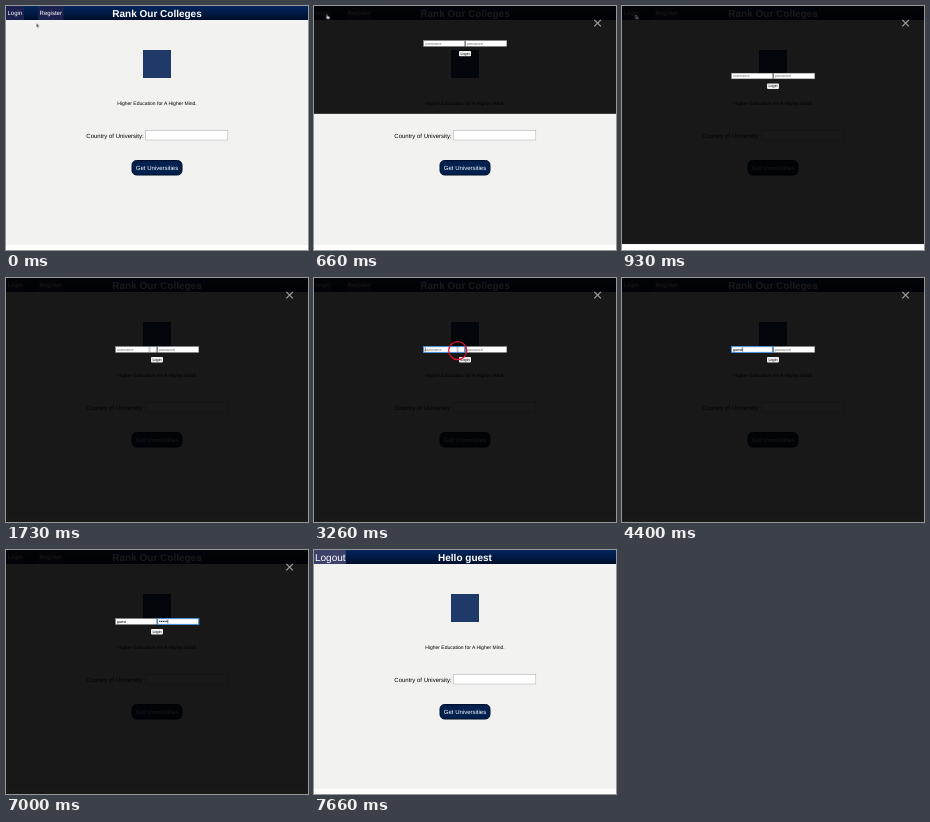
Write an HTML page that moves like this. It is 302x244 px and loops after 8000 ms.

```html
<!DOCTYPE html>
<html lang="en">
<head>
<meta charset="utf-8">
<title>Rank Our Colleges</title>
<style>
  html, body { margin: 0; width: 100%; height: 100%; overflow: hidden; background: #fff; }
  svg { display: block; width: 100vw; height: 100vh; --t: 0ms; }
  text { font-family: "Liberation Sans", Arial, sans-serif; font-size: 6px; text-rendering: geometricPrecision; white-space: pre; }
  .mid { text-anchor: middle; }
  .title { font-size: 10px; font-weight: bold; }
  .light { fill: #fff; }
  .small { font-size: 3.75px; }
  .hint { fill: #757575; }
  .field { fill: #fff; stroke: #a8a8a8; stroke-width: .5; }
  .focus { fill: none; stroke: #4a8fe0; stroke-width: 1; }
  .ring { fill: none; stroke: #e0142c; stroke-width: 1.2; }

  /* Animations stay paused; the clock --t moves them through their delay. */
  .curtain, .form, .ring, .cursor { animation: 500ms ease calc(534ms - var(--t)) both paused; }
  .curtain { animation-name: drop; }
  .form { animation-name: sink; }
  .ring { animation: fade 270ms ease-in calc(var(--at) - var(--t)) both paused; }
  .cursor { animation: travel 8000ms ease-in-out calc(0ms - var(--t)) both paused; }
  @keyframes drop { from { transform: translateY(-244px); } to { transform: none; } }
  @keyframes sink { from { transform: translateY(-61px); } to { transform: none; } }
  @keyframes fade { to { opacity: .1; } }
  @keyframes travel {
    0%, .4% { transform: translate(30.5px, 17.5px); }
    5%, 11% { transform: translate(12.5px, 8.5px); }
    21.6%, 55.4% { transform: translate(143.5px, 71.5px); }
    60%, 100% { transform: translate(172px, 71.5px); }
  }
</style>
</head>
<body>
<svg viewBox="0 0 302 244" preserveAspectRatio="none">
  <defs>
    <linearGradient id="navy" x2="0" y2="1">
      <stop stop-color="#00265c"/>
      <stop offset="1" stop-color="#000d2b"/>
    </linearGradient>
  </defs>

  <rect width="302" height="244" fill="#fff"/>
  <rect width="302" height="239" fill="#f2f2f1"/>
  <rect width="302" height="14" fill="url(#navy)"/>

  <g data-show="0-7660">
    <rect width="18" height="14" fill="#1c2250"/>
    <rect x="32" width="25.5" height="14" fill="#1c2250"/>
    <text class="light" x="1.5" y="9.4">Login</text>
    <text class="light" x="33.6" y="9.4">Register</text>
    <text class="title light mid" x="151" y="11">Rank Our Colleges</text>
  </g>
  <g data-show="7660-8000">
    <rect width="32" height="14" fill="#3c4168"/>
    <text class="light" x="1" y="11" style="font-size:10px">Logout</text>
    <text class="title light mid" x="151" y="11">Hello guest</text>
  </g>

  <rect x="137" y="44" width="28" height="28" fill="#1f3a68"/>
  <text class="mid" x="151" y="98.7" style="font-size:5px">Higher Education for A Higher Mind.</text>
  <text x="80.3" y="131.8">Country of University:</text>
  <rect class="field" x="139.5" y="124.7" width="82.3" height="9.3"/>
  <rect x="126" y="154.5" width="50" height="14.5" rx="4.5" fill="#00204e" stroke="#000c28"/>
  <text class="light mid" x="151" y="164">Get Universities</text>

  <g data-show="530-7530">
    <rect class="curtain" width="302" height="244" fill="#000" fill-opacity=".9"/>
    <g data-show="560-7530">
      <path d="M280.3 13.8l6.6 6.6m0-6.6l-6.6 6.6" stroke="#a0a0a0" stroke-width="1.2"/>
      <g class="form">
        <rect class="field" x="109.7" y="68.7" width="41" height="5.6"/>
        <rect class="field" x="151.7" y="68.7" width="41" height="5.6"/>
        <rect class="focus" data-show="3260-4860" x="109.6" y="68.6" width="41.2" height="5.8"/>
        <rect class="focus" data-show="4860-7530" x="151.6" y="68.6" width="41.2" height="5.8"/>
        <text class="small hint" data-show="0-3800" x="110.9" y="72.6">username</text>
        <text class="small hint" data-show="0-6400" x="152.9" y="72.6">password</text>
        <text class="small" id="user" x="110.9" y="72.6"></text>
        <text class="small" id="pass" x="152.9" y="72.9" style="font-size:5px"></text>
        <rect id="caret" y="69.5" width=".5" height="4"/>
        <rect x="145" y="79" width="12" height="5.4" rx=".8" fill="#f0f0f0"/>
        <text class="small mid" x="151" y="82.9">Login</text>
      </g>
    </g>
  </g>

  <circle class="ring" data-show="460-660" cx="13" cy="10" r="9" style="--at:460ms"/>
  <circle class="ring" data-show="3260-3530" cx="143.7" cy="72.6" r="9" style="--at:3260ms"/>
  <circle class="ring" data-show="4860-5130" cx="172" cy="71.7" r="9" style="--at:4860ms"/>

  <g class="cursor">
    <path data-show="0-330 930-1660" d="M0 0v3.6l.9-.8.7 1.5.7-.3-.7-1.5h1.1z" fill="#000" stroke="#fff" stroke-width=".3"/>
    <path data-show="330-930" d="M.2 0q.5-.3.8.3v1.5l1.8.5q.5.2.4.8l-.4 1.5h-2l-1.4-1.9q.2-.5.8 0z" fill="#fff" stroke="#222" stroke-width=".3"/>
    <path data-show="1660-3800 4460-6400" d="M-.8-2h1.6m-.8 0v4m-.8 0h1.6" fill="none" stroke="#444" stroke-width=".45"/>
  </g>
</svg>

<script>
  const LOOP = 8000, TICK = 1000 / 15;
  const svg = document.querySelector("svg");
  const caret = document.getElementById("caret");

  const timed = [...document.querySelectorAll("[data-show]")].map(el => ({
    el, spans: el.dataset.show.split(" ").map(s => s.split("-").map(Number))
  }));

  const inputs = [
    { id: "user", text: "guest", from: 3260, to: 4860, keys: [3800, 3860, 4200, 4260, 4400] },
    { id: "pass", text: "•••••", from: 4860, to: 7530, keys: [6400, 6530, 6660, 6860, 7000] }
  ].map(f => ({ ...f, el: document.getElementById(f.id) }));

  function type(t) {
    for (const f of inputs) {
      const count = f.keys.filter(k => k <= t).length;
      f.el.textContent = f.text.slice(0, count);
    }
    const f = inputs.find(f => t >= f.from && t < f.to);
    if (!f) return caret.style.visibility = "hidden";
    const last = Math.max(f.from, ...f.keys.filter(k => k <= t));
    const width = f.el.textContent ? f.el.getComputedTextLength() : 0;
    caret.setAttribute("x", +f.el.getAttribute("x") + width);
    caret.style.visibility = Math.floor((t - last) / 500) % 2 ? "hidden" : "inherit";
  }

  function draw(now) {
    const n = Math.min(119, Math.floor((now % LOOP + 7) / TICK));
    const t = n * TICK;
    svg.style.setProperty("--t", t + "ms");
    for (const { el, spans } of timed)
      el.style.display = spans.some(([a, b]) => t >= a && t < b) ? "" : "none";
    type(t);
  }

  const start = performance.now();
  function loop() {
    draw(performance.now() - start);
    requestAnimationFrame(loop);
  }
  loop();
</script>
</body>
</html>
```
